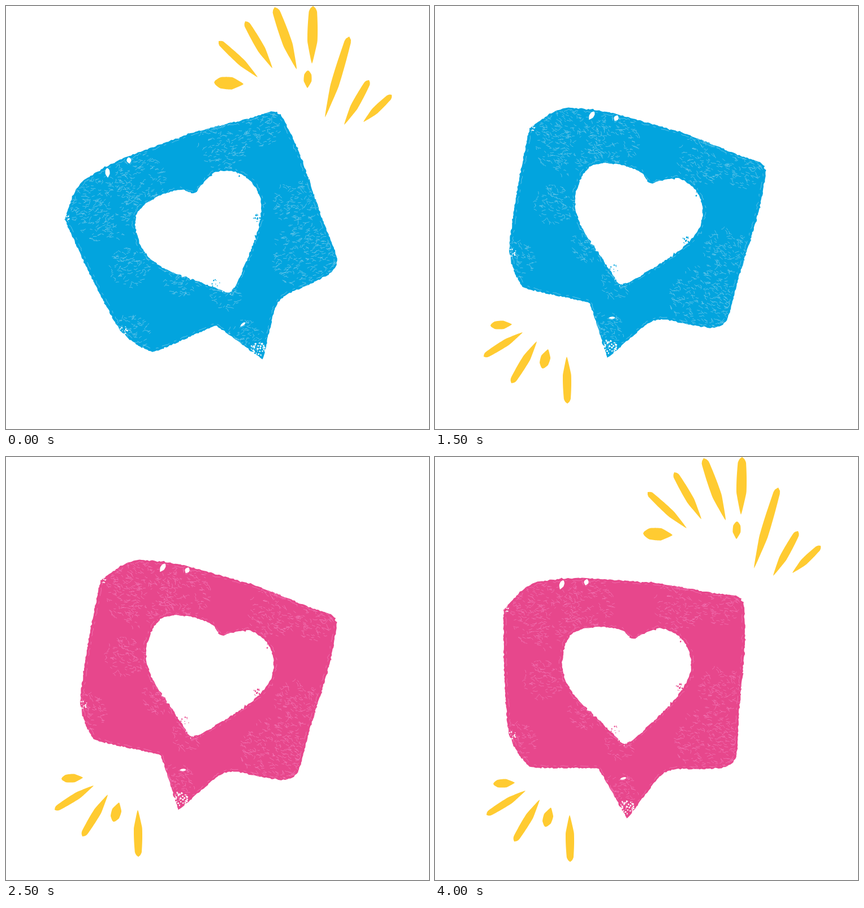
Write an HTML page with a canvas that moves like this. It is 748 by 748 pixels and loops after 4.5 s.

```html
<!DOCTYPE html>
<html lang="en">
<head>
<meta charset="utf-8">
<title>Stamped heart bubble</title>
<style>
html, body { margin: 0; width: 100%; height: 100%; overflow: hidden; background: #fff; }
canvas { display: block; width: 100vw; height: 100vh; }
</style>
</head>
<body>
<canvas id="stage" width="748" height="748"></canvas>
<script>
const ctx = document.getElementById('stage').getContext('2d');
const STEP = 500;
const RAY = '#ffcb31';
const INKS = [
  { base: '#02a4de', light: '#7ccbea' },
  { base: '#ffc60a', light: '#ffdd52' },
  { base: '#e7478c', light: '#f47cba' }
];

// Bubble centre and tilt in degrees; low: offset of the lower rays
const PIVOT = [282.5, 433];
const leanLeft = (x, y, tilt) => ({ x, y, tilt, high: true });
const leanRight = (dx, dy) => ({ x: 291.5 + dx / 2, y: 410.5 + dy / 2, tilt: 11.9, low: [dx, dy] });
const wide = leanLeft(317.5, 460, -24.1);
const POSES = [
  wide, leanRight(-12, -25),
  leanLeft(313.5, 453.5, -31.8), leanRight(0, -4),
  leanLeft(305.5, 453, -28.4), leanRight(0, 0),
  wide, leanRight(0, -18),
  { x: PIVOT[0], y: PIVOT[1], tilt: 0, high: true, low: [5, 9] }
];

let seed = 41;
function rnd() {
  seed = (seed * 1664525 + 1013904223) >>> 0;
  return seed / 4294967296;
}
const spread = a => (rnd() * 2 - 1) * a;
const mix = (a, b, t) => [a[0] + (b[0] - a[0]) * t, a[1] + (b[1] - a[1]) * t];
const dist = (a, b) => Math.hypot(b[0] - a[0], b[1] - a[1]);

function inDisc(x, y, r) {
  const a = rnd() * Math.PI * 2, d = Math.sqrt(rnd()) * r;
  return [x + Math.cos(a) * d, y + Math.sin(a) * d];
}

// Polygon whose corners [x, y, radius] are rounded, as points
function rounded(corners) {
  const n = corners.length;
  return corners.flatMap((c, i) => {
    const prev = corners[(i + n - 1) % n], next = corners[(i + 1) % n];
    const a = mix(c, prev, c[2] / dist(c, prev));
    const b = mix(c, next, c[2] / dist(c, next));
    return [0, 0.25, 0.5, 0.75, 1].map(t => mix(mix(a, c, t), mix(c, b, t), t));
  });
}

// Closed Catmull-Rom curve, as points
function smooth(pts) {
  const n = pts.length;
  return pts.flatMap((b, i) => {
    const [a, c, d] = [-1, 1, 2].map(k => pts[(i + k + n) % n]);
    return [0, 0.2, 0.4, 0.6, 0.8].map(t => [0, 1].map(k =>
      b[k] + t / 2 * (c[k] - a[k] + t * (2 * a[k] - 5 * b[k] + 4 * c[k] - d[k] +
        t * (3 * (b[k] - c[k]) + d[k] - a[k])))));
  });
}

// Adds a polygon with a torn, printed edge
function addRough(path, pts, amount) {
  pts.forEach((p, i) => {
    const q = pts[(i + 1) % pts.length];
    const n = Math.max(1, Math.round(dist(p, q) / 3));
    for (let k = 0; k < n; k++) {
      const a = rnd() < 0.06 ? amount * 2.4 : amount;
      const [x, y] = mix(p, q, k / n);
      path[i || k ? 'lineTo' : 'moveTo'](x + spread(a), y + spread(a));
    }
  });
  path.closePath();
}

// Brush stroke: blunt start, widest in the middle, pointed end
function addRay(path, x1, y1, x2, y2, w) {
  const len = Math.hypot(x2 - x1, y2 - y1);
  const nx = (y1 - y2) / len, ny = (x2 - x1) / len;
  const side = [], back = [];
  for (let i = 0; i <= 30; i++) {
    const t = i / 30, [x, y] = mix([x1, y1], [x2, y2], t);
    const h = w * Math.sqrt(Math.min(1, t * len / w)) * Math.min(1, (1 - t) * 2.6) ** 0.7 *
      (0.72 + 0.28 * Math.sin(Math.PI * t));
    side.push([x + nx * h, y + ny * h]);
    back.unshift([x - nx * h, y - ny * h]);
  }
  [...side, ...back].forEach((p, i) => path[i ? 'lineTo' : 'moveTo'](...p));
  path.closePath();
}
function fan(rays) {
  const path = new Path2D();
  rays.forEach(r => addRay(path, ...r));
  return path;
}

const upperRays = fan([
  [368, 135, 420, 138, 11], [376, 62, 445, 126, 6.5], [423, 27, 471, 110, 7],
  [475, 2, 514, 112, 8.5], [543, 0, 541, 102, 9], [534, 114, 533, 145, 7],
  [607, 54, 564, 197, 7.5], [642, 131, 598, 210, 6.8], [682, 157, 632, 205, 6.2]
]);
const lowerRays = fan([
  [98, 569, 136, 567, 7.5], [86, 624, 155, 581, 6.3], [135, 671, 180, 597, 7],
  [190, 645, 200, 611, 8.5], [234, 707, 233, 624, 7.5]
]);

const bubble = rounded([
  [121, 270, 6], [166, 222, 26], [245, 213, 30], [390, 222, 30], [500, 242, 18],
  [546, 246, 20], [549, 325, 30], [536, 470, 30], [534, 551, 36], [406, 552, 24],
  [340, 640, 3], [289, 550, 4], [166, 550, 16], [130, 500, 28], [122, 385, 30]
]);
const heart = smooth([
  [348, 321], [328, 305], [285, 301], [241, 314], [225, 362], [239, 411], [282, 457],
  [320, 494], [340, 506], [383, 470], [438, 411], [453, 365], [437, 322], [399, 303], [364, 315]
]);
const scaled = (pts, cx, cy, s) => pts.map(p => mix([cx, cy], p, s));

const shape = new Path2D(), rim = new Path2D();
addRough(shape, bubble, 0.9);
addRough(shape, heart, 1);
addRough(rim, scaled(bubble, 335, 385, 0.978), 0.8);
addRough(rim, scaled(heart, 338, 395, 1.04), 1.5);

// Worn patches [x, y, radius] are covered with short wavering scratches
const grain = new Path2D();
const worn = [
  [190, 280, 58], [270, 258, 45], [430, 262, 46], [505, 265, 32], [190, 395, 36],
  [265, 450, 32], [325, 505, 28], [480, 500, 58], [505, 410, 40], [325, 590, 34], [146, 505, 34]
];
for (const [x, y, r] of worn) {
  for (let i = 0; i < r * r * 0.075; i++) {
    let p = inDisc(x, y, r), angle = 0.2 + spread(0.5);
    grain.moveTo(...p);
    for (let k = 1 + rnd() * 3; k > 0; k--) {
      angle += spread(0.6);
      const len = 0.8 + rnd() * 1.8;
      p = [p[0] + Math.cos(angle) * len, p[1] + Math.sin(angle) * len];
      grain.lineTo(...p);
    }
  }
}

function addDots(path, x, y, radius, count, size) {
  for (let i = 0; i < count; i++) {
    const [px, py] = inDisc(x, y, radius), r = size * (0.4 + rnd() * 0.7);
    path.moveTo(px + r, py);
    path.arc(px, py, r, 0, Math.PI * 2);
  }
}

// Bare paper inside the print
const holes = new Path2D();
addRay(holes, 227, 218, 221, 234, 4);
addRay(holes, 269, 216, 266, 227, 4);
addRay(holes, 338, 567, 327, 570, 2);
addDots(holes, 340, 618, 13, 45, 1.5);
addDots(holes, 332, 497, 14, 18, 1.1);
addDots(holes, 137, 492, 7, 12, 1.3);
addDots(holes, 123, 270, 7, 12, 1.3);

// Stray ink inside the heart
const flecks = new Path2D();
addDots(flecks, 434, 409, 9, 16, 1.5);
addDots(flecks, 433, 322, 5, 4, 1.2);
addDots(flecks, 320, 484, 9, 8, 1.2);

function drawBubble(pose, ink) {
  ctx.save();
  ctx.translate(pose.x, pose.y);
  ctx.rotate(pose.tilt * Math.PI / 180);
  ctx.translate(-PIVOT[0], -PIVOT[1]);
  ctx.fillStyle = ink.base;
  ctx.fill(shape, 'evenodd');
  ctx.fill(flecks);
  ctx.clip(shape, 'evenodd');
  ctx.strokeStyle = ink.light;
  ctx.lineCap = ctx.lineJoin = 'round';
  ctx.lineWidth = 0.85;
  ctx.globalAlpha = 0.8;
  ctx.stroke(grain);
  ctx.setLineDash([14, 8, 4, 11]);
  ctx.stroke(rim);
  ctx.globalAlpha = 1;
  ctx.fillStyle = '#fff';
  ctx.fill(holes);
  ctx.restore();
}

function drawRays(rays, dx, dy) {
  ctx.save();
  ctx.translate(dx, dy);
  ctx.fillStyle = RAY;
  ctx.fill(rays);
  ctx.restore();
}

function draw(index) {
  const pose = POSES[index];
  ctx.fillStyle = '#fff';
  ctx.fillRect(0, 0, 748, 748);
  drawBubble(pose, INKS[index % INKS.length]);
  if (pose.high) drawRays(upperRays, 0, 0);
  if (pose.low) drawRays(lowerRays, ...pose.low);
}

const start = performance.now();
let shown = -1;
function tick() {
  const index = Math.floor((performance.now() - start) / STEP) % POSES.length;
  if (index !== shown) draw(shown = index);
  requestAnimationFrame(tick);
}
tick();
</script>
</body>
</html>
```
